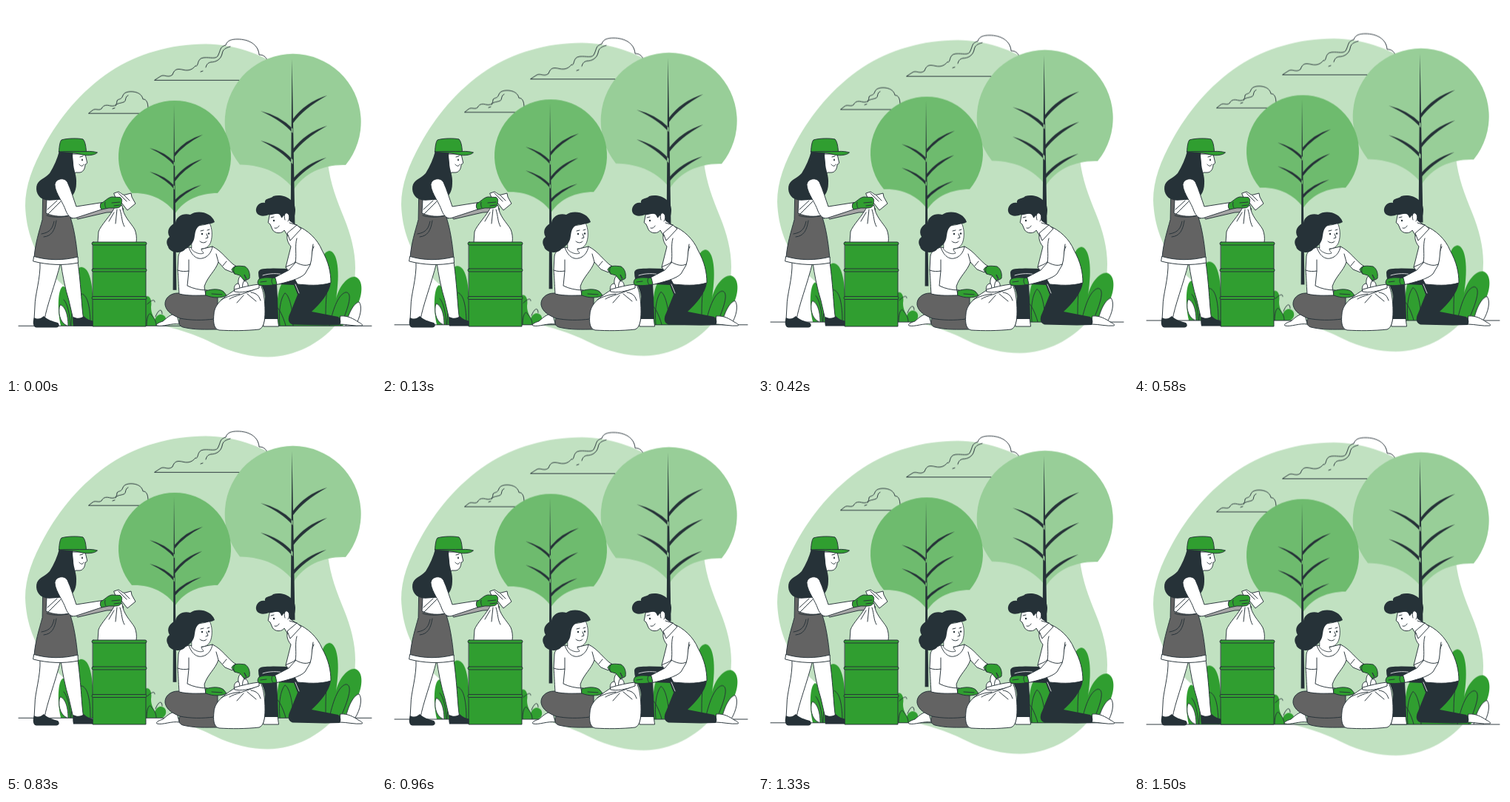
Recreate the animation shown at these times as an HTML page. Size 500 by 500 pixels, loop 1540 ms.

```html
<!DOCTYPE html>
<html lang="en">
<head>
<meta charset="utf-8">
<title>Park clean-up</title>
<style>
  html, body { margin: 0; width: 100%; height: 100%; overflow: hidden; background: #fff; }
  svg { display: block; width: 100vw; height: 100vh; }
  path, rect { stroke-linejoin: round; stroke-linecap: round; }
  .line { fill: none; stroke: #263238; stroke-width: .95; }
  .white { fill: #fff; stroke: #263238; stroke-width: .95; }
  .green { fill: #309e30; stroke: #263238; stroke-width: .95; }
  .grey { fill: #636363; stroke: #263238; stroke-width: .95; }
  .shade { fill: #a6a6a6; stroke: #263238; stroke-width: .95; }
  .dark { fill: #263238; }
  .leaf { fill: #309e30; }
</style>
</head>
<body>
<svg viewBox="0 0 500 500">
  <g id="park">
    <path fill="#c1e1c1" d="M270 51.500C222 51.500 178 65 142 88C100 116 72 152 52 188C36 217 26 243 26 270C27 305 39 334 58 358C90 397 140 416 190 427C232 436 254 443 282 457C306 469 332 474.500 354 474.500C391 474 424 456 446 431C463 410 472 385 472 354C472 332 466 309 457 287C447 262 438 240 435 212C431 160 412 112 372 84C344 64 308 52 270 51.500Z"/>

    <!-- clouds -->
    <path class="line" d="M330 100.500H200.500L209 95C214 92 219 98 225 93C228 84 233 85 240 86.500C247 88 252 86 256 81C261 83 257 71 267 70C276 69 285 73 287 66C290 60 289 55 297 53C299 46 306 45 313 45C328 45 341 52 342 66C348 66 351 69 353 73M303 55C296 57 293 59 292 65C290 73 283 76 277 76C272 77 271 80 270 83M266 88L263 89"/>
    <path class="line" d="M196 145.300H111.500L117 141C121 138 125 142 129 139C132 133 137 134 141 135C147 136 150 134 150 128C153 125 156 127 158 121C160 116 167 115.500 172 116C180 117 184 121 185 126C190 126 192 131 192 139M165 121C160 123 163 129 159 130C154 132 150 131 148 135M147 138L144 139"/>

    <path fill="#98ce98" d="M316 214.500A92 92 0 1 1 459 215C429 214 403 226 389 248C374 228 350 215 316 214.500Z"/>
    <g id="tallTree" class="dark"></g>
    <path fill="#6ebb6e" d="M170 253A76 76 0 1 1 286 253C262 253 241 262 229 280C216 262 195 252 170 253Z"/>
    <g id="smallTree" class="dark"></g>

    <!-- bushes -->
    <path class="leaf" d="M74 432C69 410 70 382 77 379C82 379 87 389 89 398C87 374 92 353 102 353C114 354 119 377 118 432Z"/>
    <path class="white" d="M82 432C72 428 70 412 73 404C79 405 84 416 84 432Z"/>
    <path class="line" d="M88 432C89 408 93 392 102 389C111 391 114 410 114 432M78 397C83 402 86 416 87 432"/>
    <path class="leaf" d="M188 432V393C193 390 198 396 196 407C196 416 200 421 201 424C204 416 211 415 215 420C218 425 215 431 211 432Z"/>
    <path class="line" d="M190 432C190 421 193 412 197 418C201 423 203 427 203 432M202 420C207 408 211 410 211 416M191 403C195 399 201 395 201 400"/>
    <path class="leaf" d="M366 432C365 404 367 378 376 372L424 374C424 350 427 332 437 331C448 332 452 359 446 396C450 379 461 366 471 366C482 368 483 386 476 402C469 417 460 426 455 432Z"/>
    <path class="white" d="M459 432C463 414 470 402 477 400C482 406 479 421 472 432Z"/>
    <path class="line" d="M370 432C368 408 372 394 377 388C384 392 388 415 388 432M437 432C443 405 450 390 459 387C468 387 465 403 452 432M437 373C432 385 432 405 432 426M378 432C374 418 369 410 367 408"/>
    <path class="line" d="M17 432.500H494" stroke-width="1"/>
  </g>

  <!-- standing girl -->
  <path class="white" d="M74 346C76 362 80 382 85 398L91 424H105C102 408 102 382 97 346Z"/>
  <path class="dark" d="M91 420C96 423 102 422 105 419C109 423 114 425 119 426V432.500H91C90 428 90 423 91 420Z"/>
  <path class="white" d="M46 346C47 368 39 390 39 406L38 424H52C55 405 66 378 74 346Z"/>
  <path class="dark" d="M38 421C43 424 48 422 51 419C56 424 63 426 70 428C73 431 72 434 68 434.500H41C36 434 36 426 38 421Z"/>
  <path class="shade" d="M94 283L134 270L156 272C160 273 159 277 155 278L136 279L97 288Z"/>
  <path class="white" d="M54 250L82 238L90 287L52 286Z"/>
  <path class="grey" d="M50 259L55 261L54 280C65 285 77 285 86 283C92 299 95 320 97 341C79 346 55 346 38 341C39 322 45 304 49 289Z"/>
  <path class="white" d="M38 338.500C56 344 78 344 97 339L97.500 347C78 351 56 350 37 345Z"/>
  <path class="line" d="M51 312C62 311 66 303 68 290M48 308C60 306 63 300 65 291M57 281L74 264M56 275L69 263M55 283C66 287 78 285 87 283"/>
  <path class="white" d="M90 200H107L109.500 211C110 213 108 214 107 214C107 220 104 225 99 225H94L88 231Z"/>
  <path class="dark" d="M72 196H91C89 201 91 208 91 212C91 221 96 229 95 240C95 252 89 261 77 262C68 261 60 264 53 262C43 260 39 249 42 241C45 234 53 233 59 226C65 216 69 207 72 196Z"/>
  <path class="white" d="M66 243C65 234 78 230 83 238C88 249 91 260 95 271L130 265.500L132 274L94 286.500C88 288 84 284 81 277C77 265 68 255 66 243Z"/>
  <path class="line" d="M99 214C101 217 104 217 105 214M100 204L104 203"/>
  <ellipse class="dark" cx="103" cy="208" rx=".9" ry="1.400"/>
  <path class="green" d="M71.500 197C72 189 73 183 75 181C83 178.500 98 178.500 104 180C107 183 108 190 108.500 196.500C114 196 120 197 123.500 198C120 202 108 203 99 200C89 197 80 199 71.500 197Z"/>
  <path class="line" d="M72 197C84 196 96 197 108.500 196.500"/>

  <!-- barrel and its bag -->
  <path class="white" d="M148 270C142 283 128 296 125 305L124 319.500H176C177 313 176 307 174 302C169 293 158 284 157 270Z"/>
  <path class="white" d="M146 253L152 251C156 253 158 256 161 255L169 253L170 258L175 267L164 276L157 267L149 261Z"/>
  <path class="line" d="M150 275L148 294M154 275C157 284 156 291 160 298M146 279L139 291M152 253L163 264M160 256L167 263"/>
  <path class="green" d="M128 267C134 264 137 259 143 258L154 258.500C157 260 157 264 156 267C156 271 153 273 148 273L139 273L129 275C127 272 127 270 128 267Z"/>
  <path class="line" d="M134 265C133 268 134 271 135 273M143 266L154 265M146 270L154 269"/>
  <rect class="green" x="117.500" y="320" width="71.500" height="113"/>
  <rect class="green" x="116" y="319" width="74" height="4" rx="2"/>
  <rect class="green" x="116" y="355" width="74" height="4" rx="2"/>
  <rect class="green" x="116" y="392.500" width="74" height="4" rx="2"/>

  <!-- kneeling woman -->
  <path class="white" d="M230 416C222 416 217 422 212 426C206 428 202 430 204 432C212 434 224 428 234 430Z"/>
  <path class="grey" d="M232 388C222 388 214 395 215 404C217 414 226 418 235 422C233 427 233 432 239 434C255 438 270 437 286 437V392L267 386Z"/>
  <path class="line" d="M235 422C249 425 266 425 281 423"/>
  <path class="white" d="M247 326C240 328 234 331 233 338L232 357C233 367 233 375 234 389C246 392 259 391 270 391L268 379C272 366 283 358 287 346L296 356L306 360L311 352C300 345 292 331 279 325L262 329Z"/>
  <path class="line" d="M232 357C237 359 242 359 247 358L245 378C253 382 262 384 272 384M247 358V343M247 326C252 341 261 342 265 341C272 340 278 333 279 325M287 346L284 335M293 351L298 345"/>
  <path class="white" d="M251 304C255 294 268 298 275 293C279 301 279 311 277 318C275 325 270 328 264 328C264 331 266 332 267 334C263 336 255 334 251 329Z" style="stroke-width:.8"/>
  <path class="dark" d="M221 312C216 303 222 296 229 293C230 284 240 279 249 282C259 275 278 279 282 292C274 297 263 293 259 299C254 305 256 313 253 318C250 325 244 326 241 330C234 336 220 332 219 325C216 320 217 315 221 312Z"/>
  <path class="line" d="M262 318C264 320 269 321 271 318M271 308L273 313L270 314M263 304L267 303M272 303L275 302"/>
  <g class="dark"><circle cx="265" cy="308" r="1.200"/><circle cx="274" cy="307.500" r="1.200"/></g>

  <!-- kneeling man -->
  <path class="white" d="M452 419C462 418 470 423 476 427C480 429 483 431 481 432C471 433 461 430 451 430Z"/>
  <path class="white" d="M350 421H367L368.500 433H348C347 430 349 427 350 421Z"/>
  <path class="dark" d="M341 360C342 354 350 355 361 354.500L383 355L398 371L439 374C437 388 425 402 413 413L449 420C453 423 453 428 451 431C430 432 407 431 387 430.500C380 428 381 421 384 415L394 390L389 377L366 376L367 394L368 423H348L350 393C349 380 341 374 341 360Z"/>
  <path fill="none" stroke="#fff" stroke-width=".8" d="M391 376L396 388M347 364C356 361 368 361 374 363"/>
  <path class="white" d="M393 297C407 302 421 315 427 330C436 346 439 360 439 374C424 379 406 377 394 376L390 369L378 353L385 325C379 318 379 311 381 306Z"/>
  <path class="line" d="M416 325C411 335 413 344 410 351M378 353C382 350 387 350 391 346"/>
  <path class="white" d="M393 314C390 324 393 336 391 347L382 357L361 368L364 377C380 373 397 369 404 362L411 350C414 341 413 331 415 322"/>
  <path class="line" d="M391 346C398 350 405 352 411 349"/>
  <path class="white" d="M357 280H381L386 292L394 297L381 311L376 303C373 308 363 308 360 302L357 295L354.500 293Z"/>
  <path class="white" d="M383 293L393 296L399 301L384 317L380 307L393 296"/>
  <path class="dark" d="M339 280C335 273 342 264 350 266C349 259 358 261 361 257C374 253 391 261 391 275C391 282 389 289 386 292C382 291 382 287 381 283C374 280 374 288 372 286C369 276 360 284 355 282C350 284 343 285 339 280Z"/>
  <path class="white" d="M377 289C375 283 377 279 380 280C384 282 383 289 381 291"/>
  <path class="line" d="M363 300C366 301 368 299 369 297M358 286L362 285"/>
  <circle class="dark" cx="362" cy="290" r="1.200"/>

  <!-- shared bag and gloves -->
  <path class="white" d="M309 387C307 381 309 375 314 375C313 368 317 362 320 365L322 372C326 371 328 376 327 382L334 387Z"/>
  <path class="line" d="M314 375C317 378 315 383 316 387M322 371C318 376 320 383 321 386"/>
  <path class="white" d="M309 384C320 387 335 380 344 377C348 384 350 398 350 413C350 426 348 435 342 437C324 439 304 439 288 438C280 436 280 426 281 416C282 402 295 393 309 384Z"/>
  <path class="line" d="M291 397C299 392 308 390 316 389M302 396C309 391 322 390 342 380M321 391L312 401M331 387C339 388 342 392 344 398M326 389L338 399"/>
  <path class="white" d="M309 383C319 380 332 377 342 376L342 381C329 386 317 388 309 386Z"/>
  <path class="green" d="M270 385C279 382 289 382 294 386L298 391C291 395 280 395 270 391Z"/>
  <path class="green" d="M305 356C308 350 315 351 323 352C328 355 330 361 329 368L326 370L322 363L325 371L321 370L316 364L309 362Z"/>
  <path class="green" d="M342 369C348 366 356 367 364 367.500L366 376C356 378 348 378 342 377C339 375 340 371 342 369Z"/>
  <path class="line" d="M278 389L292 390M310 351C307 354 307 359 309 362M360 367.500C358 371 359 374 361 376.500M344 373L352 372"/>
</svg>
<script>
  // Tapered branch from its tip [x, y] to the trunk at height base.
  function branch(trunkX, tipX, tipY, base, width) {
    const dx = tipX - trunkX, dy = tipY - base;
    const bend = `${trunkX + dx * .38} ${base + dy * .75}`;
    const under = `${trunkX + dx * .32} ${base + dy * .5}`;
    return `M${tipX} ${tipY}Q${bend} ${trunkX} ${base - width}V${base + width}Q${under} ${tipX} ${tipY}Z`;
  }

  function tree(id, x, top, bottom, half, branches) {
    const trunk = `M${x - 1} ${top}L${x - half} ${bottom}H${x + half}Z`;
    const d = trunk + branches.map(([tx, ty, base]) => branch(x, tx, ty, base, half)).join("");
    document.getElementById(id).innerHTML = `<path d="${d}"/>`;
  }

  tree("tallTree", 387.5, 72, 300, 3, [
    [344, 142, 169], [344, 182, 211], [434, 121, 156], [434, 162, 197], [433, 205, 237]
  ]);
  tree("smallTree", 228, 134, 384, 2.4, [
    [194, 192, 214], [194, 224, 246], [266, 174, 201], [265, 207, 235], [264, 242, 265]
  ]);

  // The scenery drifts up and back at constant speed.
  const at = (ms, y) => ({ offset: ms / 1540, transform: `translateY(${y}px)` });
  document.getElementById("park").animate(
    [at(0, 0), at(730, -9.5), at(1500, .5), at(1540, 0)],
    { duration: 1540, iterations: Infinity, easing: "linear" }
  );
</script>
</body>
</html>
```
